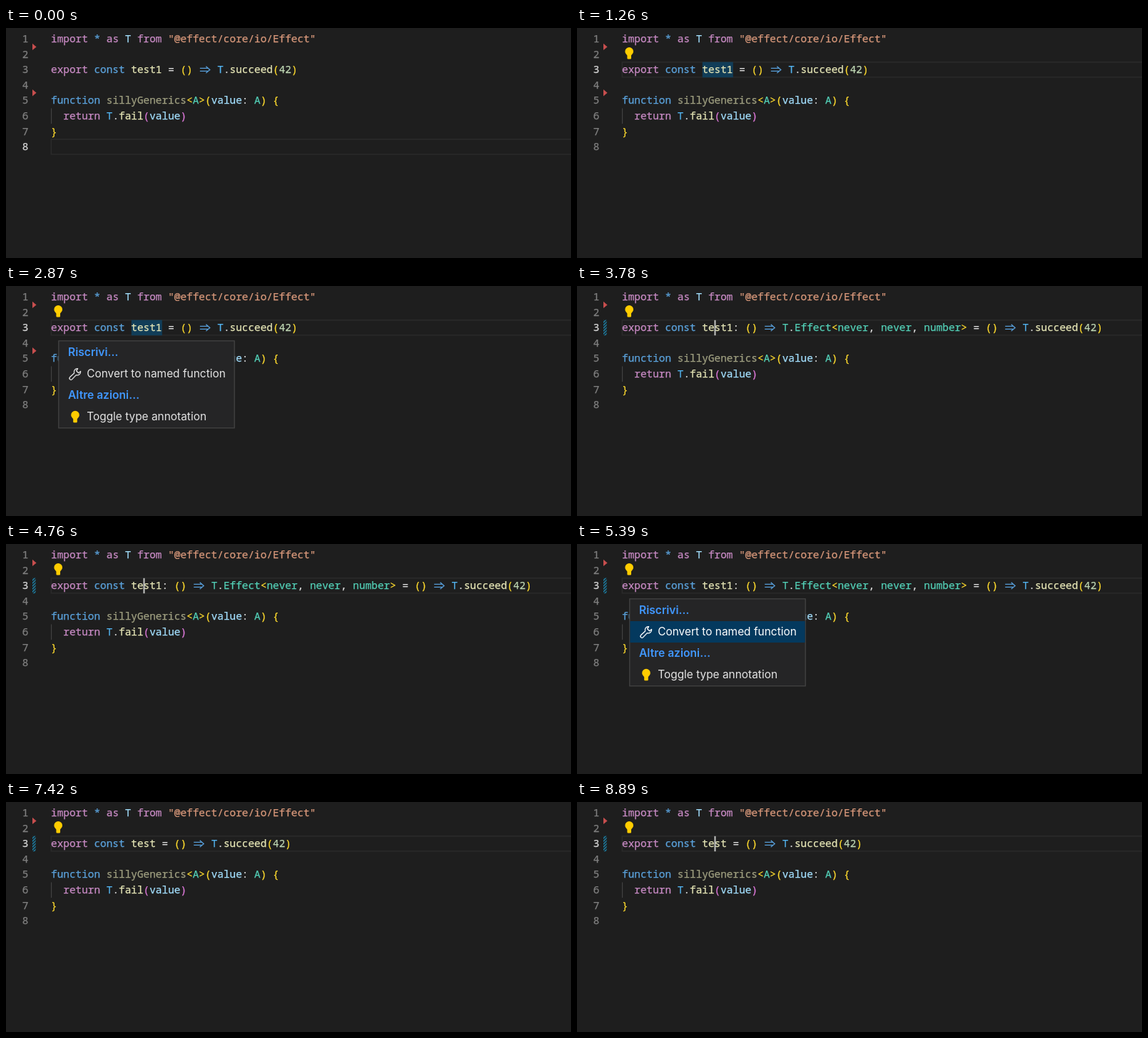
An HTML page that plays this animation: 792 by 322 pixels, repeating every 8.96 s.

```html
<!DOCTYPE html>
<html lang="en">
<head>
<meta charset="utf-8">
<title>Type annotation toggle</title>
<style>
  html, body { margin: 0; width: 100%; height: 100%; overflow: hidden; background: #1e1e1e; }
  svg { display: block; }
  text { white-space: pre; fill: currentColor; }
  .code { font: 14.4px "Noto Sans Mono", "DejaVu Sans Mono", monospace; }
  .code text { stroke: currentColor; stroke-width: 0.25; }
  .num { color: #808080; }
  .num.active { color: #d8d8d8; }
  .menu { color: #e4e4e4; font: 15.43px Inter, sans-serif; }
  .menu .head { color: #4097ff; font-size: 15.6px; font-weight: 600; }
  .menu .on { color: #fff; }
  .menu .bar { fill: none; }
  .menu .on .bar { fill: #04395e; }
  .menu .wrench { fill: none; stroke: currentColor; stroke-width: 1.3; stroke-linejoin: round; }
</style>
</head>
<body>
<svg width="792" height="322" viewBox="0 0 792 322">
  <defs>
    <pattern id="hatch" width="4" height="4" patternUnits="userSpaceOnUse">
      <path d="M-1 1 1 -1M0 4 4 0M3 5 5 3" stroke="#1b81a8" stroke-width="1.5"/>
    </pattern>
    <path id="bulb" fill="#fc0" d="M-2.8 3.8C-2.8 2.4 -5.8 1.4 -5.8 -2.2A5.8 5.8 0 0 1 5.8 -2.2C5.8 1.4 2.8 2.4 2.8 3.8V7.2Q2.8 8.4 1.6 8.4H-1.6Q-2.8 8.4 -2.8 7.2Z"/>
    <path id="arrow" d="M1.5 -2H12.6M1.5 2H12.6M10 -4.6 15.4 0 10 4.6" fill="none" stroke="#569cd6" stroke-width="1.35"/>
    <path id="mark" d="M37 -4.7 42.6 0 37 4.7Z" fill="#c74e4e"/>
  </defs>
  <rect width="792" height="322" fill="#1e1e1e"/>
  <rect id="row" x="63.3" width="740" height="21" fill="none" stroke="#2b2b2b" stroke-width="1.5"/>
  <rect id="word" x="175.8" y="47.6" width="43" height="21.6" fill="#113d58"/>
  <path d="M63.6 112.4V134" stroke="#484848"/>
  <use href="#mark" y="26.4"/>
  <use href="#mark" id="lowMark" y="90.8"/>
  <rect id="edited" x="37" y="47.6" width="4.6" height="21.6" fill="url(#hatch)"/>
  <g id="code" class="code"></g>
  <rect id="caret" x="192.5" y="47.8" width="2" height="21.4" fill="#c4c5c3"/>
  <use href="#bulb" id="hint" x="73.2" y="35"/>
  <g id="menu" class="menu">
    <rect x="73.8" y="76.8" width="246.4" height="122" fill="#252526" stroke="#454545" stroke-width="1.2"/>
    <text class="head" x="87" y="98.4">Riscrivi…</text>
    <g id="convert">
      <rect class="bar" x="74.4" y="108" width="245.2" height="30"/>
      <path class="wrench" d="M100.6 115.6A4.8 4.8 0 0 0 95.6 122L89.6 127.6A2.1 2.1 0 0 0 92.6 130.6L98.4 124.6A4.8 4.8 0 0 0 104.6 119.4L101.6 121.8 98.6 118.8Z"/>
      <text x="113.2" y="128.4">Convert to named function</text>
    </g>
    <text class="head" x="87" y="158.4">Altre azioni…</text>
    <g id="toggle">
      <rect class="bar" x="74.4" y="168" width="245.2" height="30"/>
      <use href="#bulb" x="97" y="182.8"/>
      <text x="113.2" y="188.4">Toggle type annotation</text>
    </g>
  </g>
</svg>
<script>
const LOOP = 8960, STEP = 70, BLINK = 500;
const LEFT = 63, CHAR = 8.64, PITCH = 21.6;
const CLICK = 700, HINT = 980, ADD = 3430, REMOVE = 6890;

const COLORS = {
  key: '#c98bc5', blue: '#5ba3dd', name: '#a3dffe', type: '#53d0b7', fn: '#e6e6b6',
  faded: '#9f9f80', num: '#bfd7b3', str: '#d9997b', gold: '#ffdb2e', pink: '#dc78d8',
  plain: '#dedede', ns: '#53b4f0'
};

// Each menu: open, leave first item, reach second item, close
const MENUS = [[2450, 2870, 2940, 3360], [5180, 5950, 6020, 6790]];

const $ = id => document.getElementById(id);
const baseline = n => 20 + (n - 1) * PITCH;

function add(parent, tag, attrs, text = '') {
  const el = document.createElementNS('http://www.w3.org/2000/svg', tag);
  for (const key in attrs) el.setAttribute(key, attrs[key]);
  el.textContent = text;
  return parent.appendChild(el);
}

// Tokens are written as "color:text" and a bare "=>" is drawn as one arrow
function addLine(n, tokens) {
  const group = add($('code'), 'g', {});
  const y = baseline(n);
  let col = 0;
  for (const token of tokens) {
    const x = LEFT + col * CHAR;
    if (token === '=>') {
      add(group, 'use', { href: '#arrow', x, y: y - 4.8 });
      col += 2;
      continue;
    }
    const cut = token.indexOf(':');
    const text = token.slice(cut + 1);
    if (text.trim()) add(group, 'text', { x, y, color: COLORS[token.slice(0, cut)] }, text);
    col += text.length;
  }
  return group;
}

const lambda = ['gold:()', 'plain: ', '=>', 'plain: '];
const start = name => ['key:export ', 'blue:const ', 'fn:' + name];
const value = ['plain: = ', ...lambda, 'ns:T', 'plain:.', 'fn:succeed', 'gold:(', 'num:42', 'gold:)'];
const annotation = ['plain:: ', ...lambda, 'type:T', 'plain:.', 'type:Effect', 'gold:<',
  'type:never', 'plain:, ', 'type:never', 'plain:, ', 'type:number', 'gold:>'];

addLine(1, ['key:import ', 'blue:* ', 'key:as ', 'name:T ', 'key:from ', 'str:"@effect/core/io/Effect"']);
const versions = [
  [...start('test1'), ...value],
  [...start('test1'), ...annotation, ...value],
  [...start('test'), ...value]
].map(tokens => addLine(3, tokens));
addLine(5, ['blue:function ', 'faded:sillyGenerics', 'gold:<', 'type:A', 'gold:>(', 'name:value',
  'plain:: ', 'type:A', 'gold:)', 'plain: ', 'gold:{']);
addLine(6, ['plain:  ', 'key:return ', 'ns:T', 'plain:.', 'fn:fail', 'pink:(', 'name:value', 'pink:)']);
addLine(7, ['gold:}']);

const numbers = Array.from({ length: 8 }, (_, i) =>
  add($('code'), 'text', { x: 22.8, y: baseline(i + 1), class: 'num' }, i + 1));

const show = (el, on) => el.setAttribute('visibility', on ? 'visible' : 'hidden');

function render(t) {
  const version = t >= REMOVE ? 2 : t >= ADD ? 1 : 0;
  const line = t >= CLICK ? 3 : 8;
  const since = t - [CLICK, ADD, REMOVE][version];
  const menu = MENUS.find(([open, , , close]) => t >= open && t < close);

  versions.forEach((el, i) => el.setAttribute('display', i === version ? 'inline' : 'none'));
  numbers.forEach((el, i) => el.classList.toggle('active', i + 1 === line));
  $('row').setAttribute('y', 4.6 + (line - 1) * PITCH);
  show($('word'), t >= HINT && version === 0);
  show($('hint'), t >= HINT);
  show($('edited'), version > 0);
  show($('lowMark'), version === 0);
  show($('caret'), since >= 0 && !menu && Math.floor(since / BLINK) % 2 === 0);
  show($('menu'), menu);
  $('convert').classList.toggle('on', !!menu && t < menu[1]);
  $('toggle').classList.toggle('on', !!menu && t >= menu[2]);
}

const begin = performance.now();
function tick() {
  const t = (performance.now() - begin) % LOOP;
  render(Math.floor(t / STEP) * STEP);
  requestAnimationFrame(tick);
}
tick();
</script>
</body>
</html>
```
